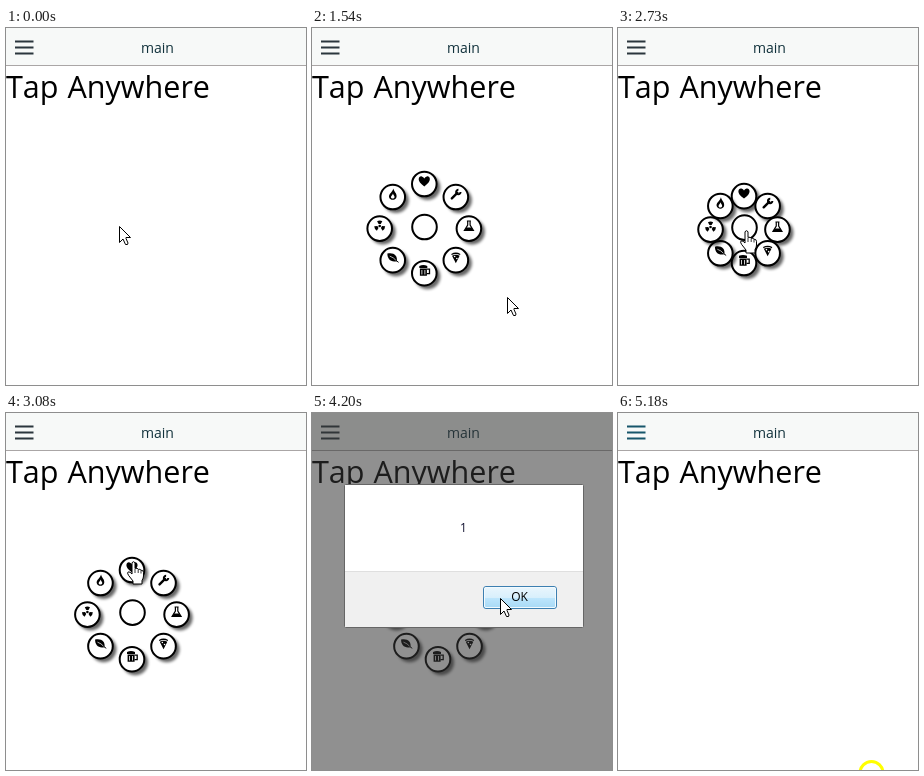
An HTML page that plays this animation: 300 by 357 pixels, repeating every 5250 ms.

```html
<!DOCTYPE html>
<html lang="en">
<head>
<meta charset="utf-8">
<title>Radial menu demo</title>
<style>
  html, body { margin: 0; width: 100%; height: 100%; overflow: hidden; background: #fff; }
  svg { display: block; width: 300px; height: 357px; }
  text { font-family: "Open Sans", "Noto Sans", sans-serif; font-kerning: none; }
  .ink { stroke: #000; fill: none; }
  .cut { fill: #fff; stroke: none; }
</style>
</head>
<body>
<svg viewBox="0 0 300 357">
  <defs>
    <filter id="soft" x="-50%" y="-50%" width="200%" height="200%">
      <feGaussianBlur stdDeviation="1.5"/>
    </filter>
    <linearGradient id="plain" x2="0" y2="1">
      <stop offset="0" stop-color="#f3f3f3"/><stop offset=".5" stop-color="#e9e9e9"/>
      <stop offset=".5" stop-color="#dbdbdb"/><stop offset="1" stop-color="#cfd1d2"/>
    </linearGradient>
    <linearGradient id="hover" x2="0" y2="1">
      <stop offset="0" stop-color="#eaf6fd"/><stop offset=".5" stop-color="#d8effc"/>
      <stop offset=".5" stop-color="#bee6fd"/><stop offset="1" stop-color="#a7d9f5"/>
    </linearGradient>
  </defs>

  <rect width="300" height="357" fill="#fff"/>
  <rect width="300" height="37" fill="#f7f9f8"/>
  <rect y="37" width="300" height="1" fill="#aaa6a6"/>
  <path id="bars" d="M9 13.5H27.5M9 19.5H27.5M9 25.5H27.5" stroke-width="1.8"/>
  <text x="151.5" y="25" font-size="14" text-anchor="middle" fill="#12323c">main</text>
  <text x="0" y="70" font-size="30.5" word-spacing="1">Tap Anywhere</text>

  <g id="menu"></g>
  <circle id="ring" cx="253.5" cy="360" r="11.5" fill="#fff" stroke="#ff0" stroke-width="3"/>
  <rect id="shade" width="300" height="357" fill="#363636"/>

  <g id="dialog">
    <rect x="32.5" y="71.5" width="239" height="143" rx="1" fill="#fff" stroke="#666"/>
    <rect x="33" y="158" width="238" height="56" fill="#f0f0f0"/>
    <rect x="33" y="158" width="238" height="1" fill="#dfdfdf"/>
    <text x="151.5" y="119" font-size="12" text-anchor="middle" fill="#101030">1</text>
    <rect id="button" x="171.5" y="173.5" width="73" height="22" rx="2.5"/>
    <rect id="glow" x="172.5" y="174.5" width="71" height="20" rx="1.5" fill="none"/>
    <text x="207.5" y="188.4" font-size="12" text-anchor="middle">OK</text>
  </g>

  <g id="cursor" stroke="#000" fill="#fff" stroke-linejoin="round">
    <path id="arrow" d="M.5 .5V16.5L4 13L6.5 18.5H8.5L9 17L7 12.5V11.5H11.5Z"/>
    <g id="hand" transform="translate(-4 -1)">
      <path d="M5 1.7Q6.5 -.3 8 1.7V7.2L10 7.4Q11 7.5 11.5 8.4Q13 7.8 14 9.2Q16.3 9 16.5 11.3V15Q16.5 17 15 19.5V23H6V20L1.5 14.3Q-.2 11.7 1.2 10.9Q3 10.5 5 13Z"/>
      <path d="M8 7.5V12M11.2 8.5V12M14 9.5V12.5" stroke-width=".8"/>
    </g>
  </g>
</svg>
<script>
const LOOP = 5250, STEP = 70, RADIUS = 44.6;
const el = id => document.getElementById(id);
const show = (id, on) => el(id).setAttribute('display', on ? 'inline' : 'none');
const set = (id, attrs) => { for (const k in attrs) el(id).setAttribute(k, attrs[k]); };

// Icons clockwise from the top, drawn around 0,0
const icons = [
  '<path d="M0 5C-9 -1 -5 -6 -2.5 -5Q-.8 -4.6 0 -3Q.8 -4.6 2.5 -5C5 -6 9 -1 0 5Z"/>',
  '<path class="ink" stroke-width="2.4" stroke-linecap="round" d="M-4 4L1.5 -1.5"/>' +
    '<path class="ink" stroke-width="2" d="M2.6 -4.6A2.2 2.2 0 1 0 4.7 -2.4"/>',
  '<path class="ink" stroke-width="1.2" d="M-2 -5H2M-1.2 -5V-1L-4.5 4.5H4.5L1.2 -1V-5"/><path d="M-2.6 1.5H2.6L4.5 4.6H-4.5Z"/>',
  '<path d="M-4.6 -3.6Q0 -6.4 4.6 -3.6L4.2 -2.5Q0 -4.8 -4.2 -2.5ZM-3.8 -1.9Q0 -3.8 3.8 -1.9L0 5.6Z"/>' +
    '<circle class="cut" cx="-1.2" cy="-1" r=".8"/><circle class="cut" cx="1" cy="1" r=".8"/>',
  '<path d="M-5 -4.6Q-1 -6.4 3 -4.6V-2.5H-5ZM-4.4 -2H2.6V5.2H-4.4Z"/>' +
    '<path class="ink" stroke-width="1.3" d="M2.5 -1.4H5.2V3H2.5"/><path class="cut" d="M-2.8 -.5H-2V4H-2.8ZM.2 -.5H1V4H.2Z"/>',
  '<path d="M-5.4 -4C1 -5.4 5 -2 4 3.6C-2 5 -5.4 1.6 -5.4 -4Z"/><path class="ink" d="M2 2L5.8 4.8"/>' +
    '<path d="M-3 -1.4Q1 0 3 2.6" stroke="#fff" stroke-width=".7" fill="none"/>',
  '<circle r="1.3"/>' + [0, 120, 240].map(a =>
    `<path transform="rotate(${a})" d="M-1.1 -2L-2.6 -4.8Q0 -6.2 2.6 -4.8L1.1 -2Z"/>`).join(''),
  '<path d="M.6 -6C1 -3 4.2 -1.4 3.8 2.2C3.2 6.4 -3.2 6.4 -3.8 2.2C-4 -.6 -.4 -2.4 .6 -6Z"/>' +
    '<path class="cut" d="M.2 -1C.4 .6 2 1.4 1.8 2.8C1.4 4.6 -1.6 4.6 -1.8 2.8C-1.9 1.4 0 .6 .2 -1Z"/>'
];
const disc = '<circle r="12.3" fill="#fff" stroke="#000" stroke-width="2"/>';
el('menu').innerHTML = icons.map(icon =>
  `<g><circle cx="3.2" cy="3.2" r="12.8" opacity=".6" filter="url(#soft)"/>${disc}` +
  `<g transform="translate(0 -2.6)">${icon}</g></g>`).join('') + `<g>${disc}</g>`;
const parts = [...el('menu').children];

const menus = [
  { from: 560, to: 1750, x: 112.3, y: 200.6, hub: [112.5, 199] },
  { from: 2590, to: 4480, x: 126, y: 201.6, hub: [126.5, 199.6] }
];

// Pointer: time, x, y
const path = [
  [0, 113, 198], [140, 113, 198], [210, 113, 201], [280, 113, 201], [350, 113, 202],
  [1120, 113, 202], [1330, 145, 231], [1540, 195, 269], [1820, 195, 269],
  [1960, 183, 230], [2100, 155, 189], [2240, 113, 181], [2310, 113, 181],
  [2450, 126, 203], [2730, 126, 203], [3080, 125, 149], [3430, 125, 149],
  [3500, 125, 152], [3640, 125, 152], [3780, 119, 156], [4200, 188, 185],
  [4480, 188, 185], [4900, 254, 360]
];

function pointer(t) {
  const i = path.findIndex(k => k[0] > t);
  if (i < 0) return path[path.length - 1].slice(1);
  const [a, b] = [path[i - 1], path[i]];
  const p = (t - a[0]) / (b[0] - a[0]);
  return [1, 2].map(n => Math.round(a[n] + (b[n] - a[n]) * p));
}

function spots(m, t) {
  const p = Math.min(1, (t - m.from + STEP) / 420);
  const r = RADIUS * (1 - (1 - p) ** 2);
  return icons.map((_, i) => {
    const a = i * Math.PI / 4;
    return [m.x + r * Math.sin(a), m.y - r * Math.cos(a)];
  }).concat([m.hub]);
}

function draw(t) {
  const [x, y] = pointer(t);
  const menu = menus.find(m => t >= m.from && t < m.to);
  const alerting = t >= 3500 && t < 4410;
  let over = false;

  show('menu', menu);
  if (menu) spots(menu, t).forEach(([px, py], i) => {
    parts[i].setAttribute('transform', `translate(${px} ${py})`);
    over = over || Math.hypot(px - x, py - y) < 13.3;
  });

  const fading = t === 3500 || t === 4410;
  set('shade', { opacity: fading ? .28 : alerting ? .55 : 0 });
  show('dialog', alerting);
  const hot = x > 171 && x < 245 && y > 173 && y < 196;
  set('button', { fill: hot ? 'url(#hover)' : 'url(#plain)', stroke: '#3c7fb1' });
  set('glow', { stroke: hot ? '#f2fafe' : '#46d0f2' });

  set('bars', { stroke: t >= 4480 ? '#17566b' : '#2b363d' });
  show('ring', t >= 5180);
  set('cursor', { transform: `translate(${x} ${y})` });
  show('cursor', t < 4900);
  const hand = over && !alerting && !fading;
  show('hand', hand);
  show('arrow', !hand);
}

const start = performance.now();
function tick() {
  const t = (performance.now() - start) % LOOP;
  draw(Math.floor(t / STEP) * STEP);
  requestAnimationFrame(tick);
}
tick();
</script>
</body>
</html>
```
